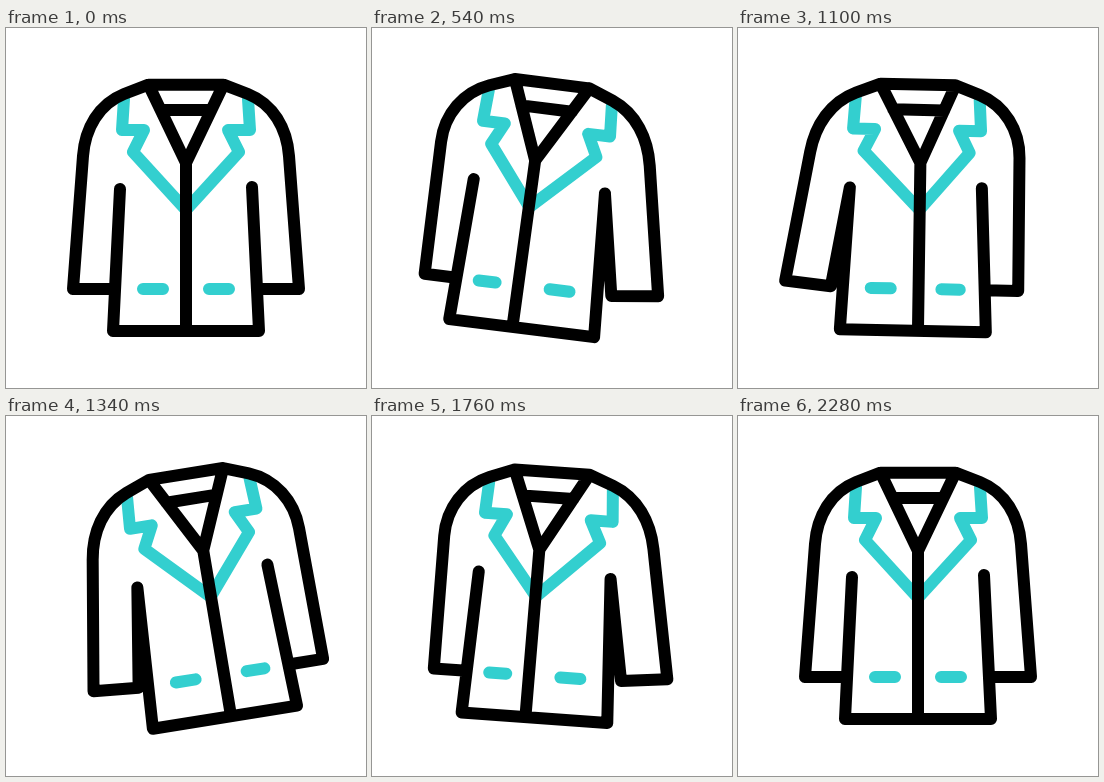
Recreate the animation shown at these times as an HTML page. Size 360 by 360 pixels, loop 2.42 s.

```html
<!DOCTYPE html>
<html lang="en">
<head>
<meta charset="utf-8">
<title>Swinging jacket</title>
<style>
html, body { margin: 0; width: 100%; height: 100%; overflow: hidden; background: #fff; }
svg { display: block; width: 100vw; height: 100vh; }
path { fill: none; stroke: #000; stroke-width: 12; stroke-linecap: round; stroke-linejoin: round; }
#trim { stroke: #33cfcf; }
</style>
</head>
<body>
<svg viewBox="0 0 360 360">
  <g id="jacket"><path id="trim"/><path id="outline"/></g>
</svg>
<script>
const LOOP = 2420, STEP = 20;

// time, swing angle, sleeve drag, front drag
const keys = [
  [210, 0, 0, 0], [540, 7.1, 1, 1], [740, 10.1, .9, .9], [840, 11, .75, .8],
  [900, 10.7, .55, .7], [1100, 1.2, -.85, -.55], [1280, -6.8, -.9, -.8],
  [1380, -9.8, -.45, -.5], [1600, -.8, 1, 1.1], [1820, 5.1, .85, .9],
  [1870, 5.4, .75, .8], [1960, 4.3, .6, .7], [2280, 0, 0, 0]
];

const slope = (i, c) => (keys[i + 1][c] - keys[i][c]) / (keys[i + 1][0] - keys[i][0]);

// Tangent that never overshoots: flat at the ends and at every extreme.
function tangent(i, c) {
  if (i === 0 || i === keys.length - 1) return 0;
  const a = slope(i - 1, c), b = slope(i, c);
  return a * b > 0 ? 2 * a * b / (a + b) : 0;
}

function sample(t, c) {
  if (t <= keys[0][0] || t >= keys[keys.length - 1][0]) return 0;
  const i = keys.findIndex(k => k[0] > t) - 1;
  const [p, q] = [keys[i], keys[i + 1]];
  const h = q[0] - p[0], u = (t - p[0]) / h, v = 1 - u;
  return v * v * (1 + 2 * u) * p[c] + u * u * (3 - 2 * u) * q[c]
    + h * u * v * (v * tangent(i, c) - u * tangent(i + 1, c));
}

const line = points => 'M' + points.map(p => p.join(' ')).join('L');
const mix = (a, b, u) => a + (b - a) * u;

// side is -1 for left, 1 for right; x is measured outwards from the middle
function half(side, drag, front) {
  const at = (x, y) => [180 + side * x, y];
  const out = Math.max(0, side * drag), back = Math.min(0, side * drag);
  const elbow = [103 + 4 * out, 128 - 2 * out];
  const cuff = [113 + 18.5 * out + 10 * back, 261 - 6.5 * out];
  const bend = elbow.map((e, i) => e + (e - cuff[i]) * .21);
  const pit = at(66, side < 0 ? 161 : 159);
  const turn = Math.min(0, side * front);
  const pocket = 33 - 7 * turn, reach = 10 + 1.5 * turn;
  return {
    collar: at(37.5, 56.7),
    pit,
    hem: at(73, 303),
    sleeve: `M${at(37.5, 56.7)}L${at(62, 66)}C${at(87, 76)} ${at(...bend)} ${at(...elbow)}`
      + `L${at(...cuff)}L${at(71 + 14 * out, 261 - out)}L${pit}`,
    lapel: [at(62, 71), at(64, 102), at(42, 102), at(53, 124)],
    pocket: line([at(pocket - reach, 261), at(pocket + reach, 261)])
  };
}

const byId = id => document.getElementById(id);
const jacket = byId('jacket'), trim = byId('trim'), outline = byId('outline');

function draw(now) {
  const t = Math.floor(now % LOOP / STEP) * STEP;
  const [angle, drag, front] = [1, 2, 3].map(c => sample(t, c));
  const l = half(-1, drag, front), r = half(1, drag, front);
  const mid = 180 - 7.3 * front;
  const apex = [mid, 135];
  const neck = p => [mix(p.collar[0], mid, .32), 82];

  jacket.setAttribute('transform', `rotate(${angle} 188 57)`);
  trim.setAttribute('d', line([...l.lapel, [mid, 182], ...r.lapel.reverse()]) + l.pocket + r.pocket);
  outline.setAttribute('d', l.sleeve + r.sleeve
    + line([l.pit, l.hem, r.hem, r.pit])
    + line([l.collar, apex, r.collar]) + 'Z'
    + line([neck(l), neck(r)])
    + line([apex, [180 - 9.3 * front, 303]]));
}

const start = performance.now();
function tick() {
  draw(performance.now() - start);
  requestAnimationFrame(tick);
}
tick();
</script>
</body>
</html>
```
